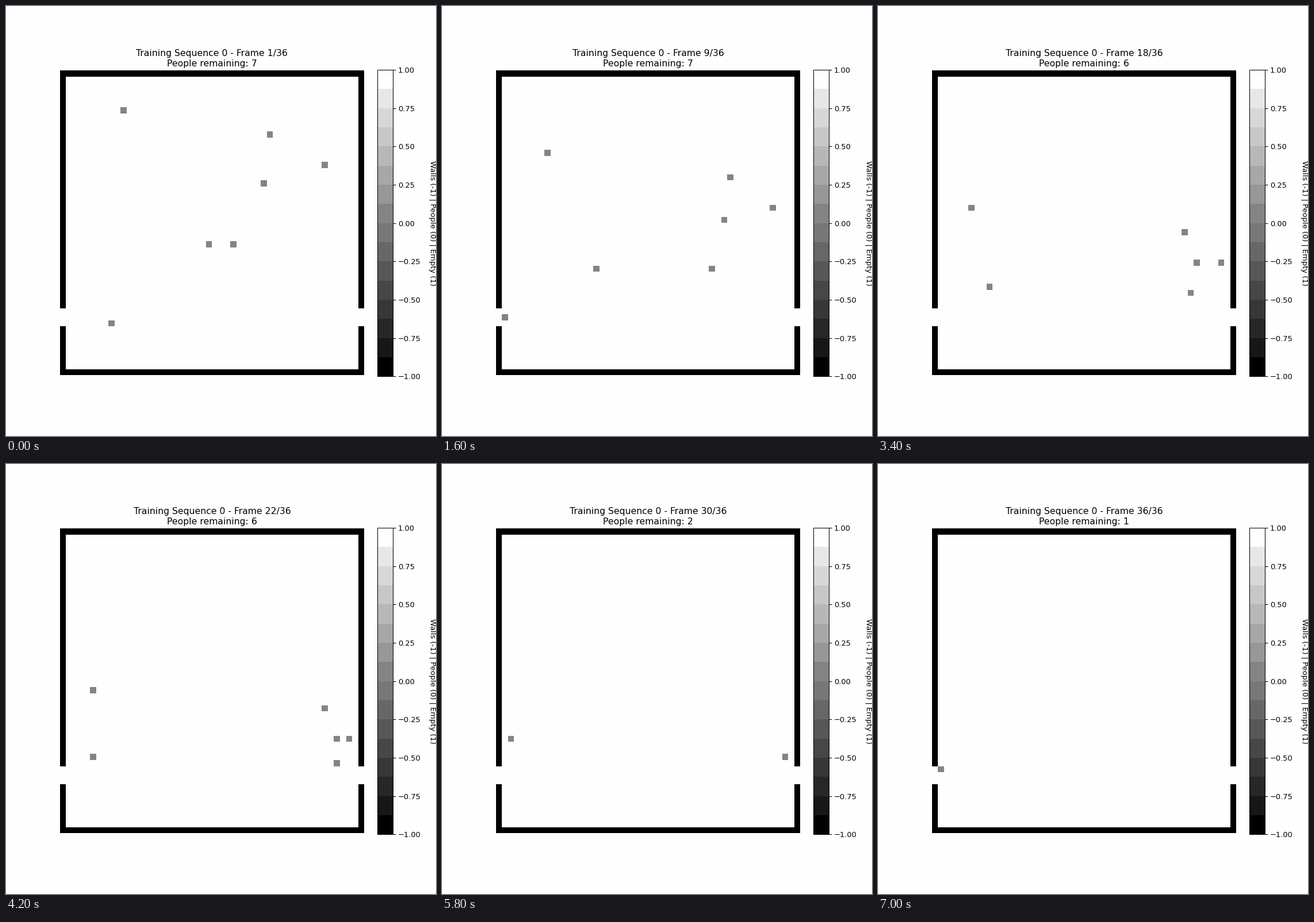
A matplotlib script for the animation above (7200 ms loop, 748 by 748 pixels).

```python
import numpy as np
import matplotlib.pyplot as plt
from matplotlib.animation import FuncAnimation
from matplotlib.colors import ListedColormap

STAGE = 748
SIZE = 50
FRAMES = 36
WALL, PERSON, EMPTY = -1, 0, 1
DOOR = slice(39, 42)

# Start column and row, then columns and rows walked per step.
PEOPLE = [
    (10.49, 5.52, -0.28, 0.969),
    (34, 10, 0.4405, 0.92),
    (43, 15, 0.21, 0.925),
    (32.6, 18, 0.6, 0.785),
    (23.52, 28, -0.88, 0.44),
    (28, 28, 0.83, 0.49),
    (8, 41, -0.93, -0.12),
]


def empty_room():
    room = np.full((SIZE, SIZE), EMPTY)
    room[[0, -1], :] = WALL
    room[:, [0, -1]] = WALL
    room[DOOR, 0] = room[DOOR, -1] = EMPTY
    return room


def room_at(step):
    room = empty_room()
    for col, row, dx, dy in PEOPLE:
        x, y = round(col + dx * step), round(row + dy * step)
        if 0 < x < SIZE - 1:  # a person who reaches a door column has left
            room[y, x] = PERSON
    return room


def gray_bands():
    levels = [16 * i + 7 for i in range(16)]
    levels[0], levels[8], levels[-1] = 0, 132, 254
    return ListedColormap([(v / 255,) * 3 for v in levels])


def add_axes(left, top, width, height):
    box = np.array([left, STAGE - top - height, width, height])
    return fig.add_axes(tuple(box / STAGE))


plt.rcParams["font.family"] = "DejaVu Sans"
cmap = gray_bands()
fig = plt.figure(figsize=(8, 8), dpi=STAGE / 8, facecolor=cmap(1.0))

ax = add_axes(93.5, 112.4, 529.85, 529.85)
mesh = ax.pcolormesh(room_at(0), cmap=cmap, vmin=WALL, vmax=EMPTY, snap=True)
ax.invert_yaxis()
ax.axis("off")
title = ax.set_title("")

bar = fig.colorbar(mesh, cax=add_axes(646.2, 111, 26.7, 533.3))
bar.set_label("Walls (-1) | People (0) | Empty (1)", rotation=270, labelpad=20)


def update(step):
    room = room_at(step)
    mesh.set_array(room)
    title.set_text(f"Training Sequence 0 - Frame {step + 1}/{FRAMES}\n"
                   f"People remaining: {np.sum(room == PERSON)}")
    return mesh, title


anim = FuncAnimation(fig, update, frames=FRAMES, interval=200, repeat=True,
                     repeat_delay=0)
plt.show()
```
